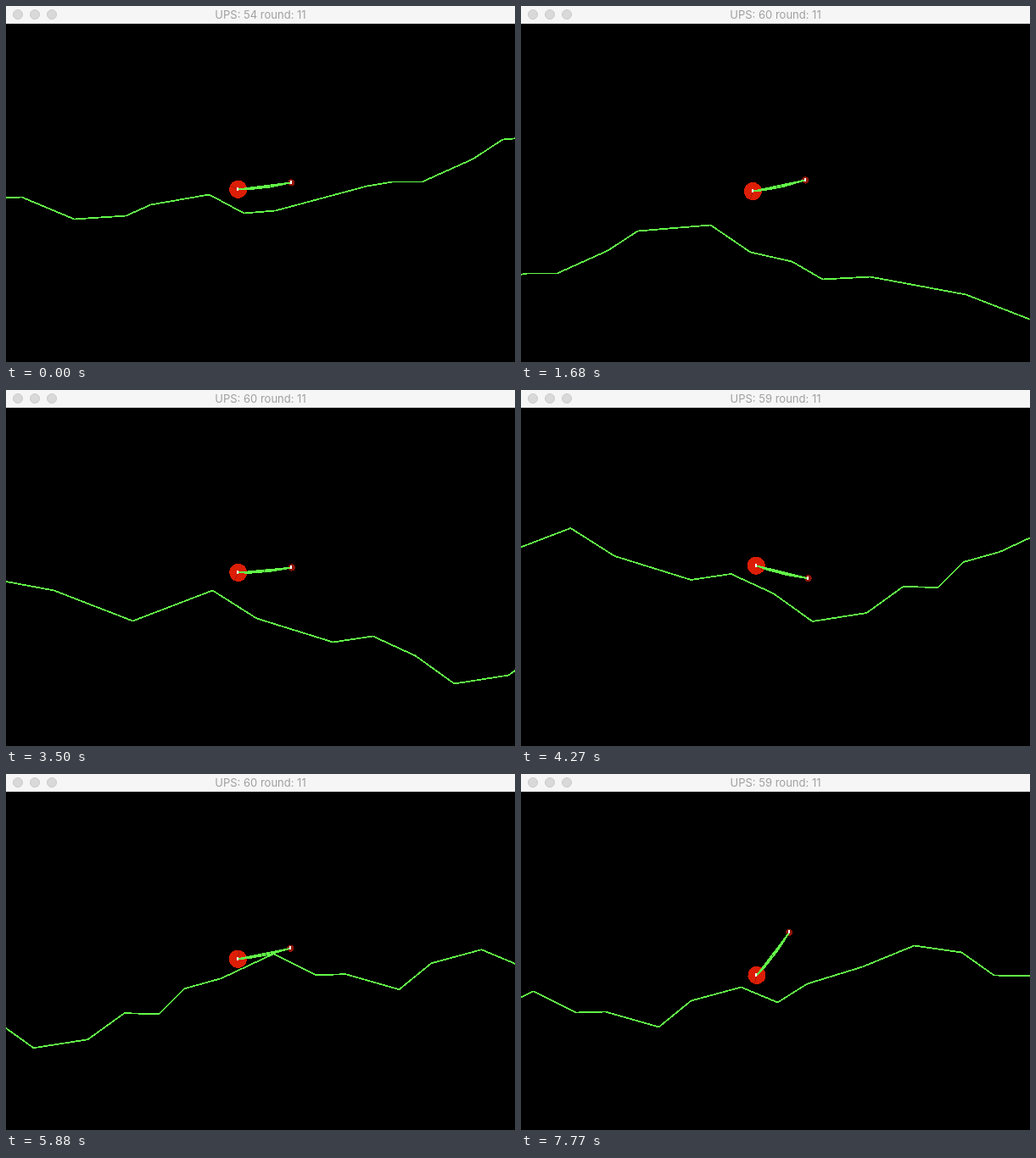
These frames come from a looping animation (600x420 px, 7.84 s). An HTML page:

```html
<!DOCTYPE html>
<html lang="en">
<head>
<meta charset="utf-8">
<title>Hill ride</title>
<style>
  html, body { margin: 0; width: 100%; height: 100%; overflow: hidden; background: #000; }
  .bar {
    position: absolute; top: 0; left: 0; width: 600px; height: 21px;
    box-sizing: border-box; background: #f6f6f6; border-bottom: 1px solid #dedede;
    color: #a0a0a0; text-align: center;
    font: 13px/21px Inter, "Liberation Sans", sans-serif;
  }
  .bar i {
    position: absolute; top: 4px; width: 12px; height: 12px; box-sizing: border-box;
    border-radius: 50%; background: #d9d9d9; border: 1px solid #cbcbcb;
  }
  svg { position: absolute; top: 0; left: 0; shape-rendering: crispEdges; }
  polyline { fill: none; stroke: #62fb48; stroke-width: 1.8; }
  .spoke { stroke: #a81806; stroke-width: 1; }
</style>
</head>
<body>
<svg width="600" height="420" viewBox="-0.5 -0.5 600 420">
  <polyline id="hills"/>
  <g id="rear"><circle r="10.6" fill="#dc1e06"/><line class="spoke" x2="10"/></g>
  <g id="front"><circle r="4" fill="#8f1508"/><line class="spoke" x2="4"/></g>
  <polyline id="frame"/>
  <rect id="rearHub" width="2" height="4" fill="#fff"/>
  <rect id="frontHub" width="2" height="4" fill="#fff"/>
</svg>
<div class="bar">
  <i style="left:8px"></i><i style="left:28px"></i><i style="left:48px"></i>
  <span id="title"></span>
</div>
<script>
const STEP = 70, STEPS = 112;
const BAR = 63.3, REAR = 10.6, FRONT = 4;
const GRAVITY = 2.1, NOSE_DROP = 2; // per step
const el = id => document.getElementById(id);

// Corners of the hills in world coordinates
const ground = [
  [-2, 226], [18, 225], [80, 251], [141, 247], [170, 234], [239, 222], [280, 244],
  [317, 241], [425, 212], [455, 207], [490, 207], [550, 180], [585, 157], [671, 150],
  [718, 182], [767, 193], [803, 214], [859, 211], [972, 232], [1065, 268], [1159, 232],
  [1211, 265], [1301, 293], [1348, 286], [1398, 309], [1444, 342], [1508, 332],
  [1551, 301], [1592, 302], [1622, 272], [1665, 260], [1727, 231], [1777, 256],
  [1812, 255], [1875, 273], [1913, 242], [1972, 226], [2015, 244], [2050, 222],
  [2115, 202], [2176, 177], [2232, 185], [2270, 212], [2320, 213]
];

// Key poses: step, scroll, lift of the ground, tilt in degrees
const keys = [
  [0, 0, 0, 7.2], [24, 448, 108, 12], [34, 623, -2, -15.5], [50, 916, 4, 5.4],
  [72, 1268, -62, 36.7], [95, 1532, -24, -18.4], [111, 1713, 25, 52.8]
];

const updates = [54, 60, 59, 60, 59, 61, 60, 59]; // per second, a new count every 14 steps

function groundY(x) {
  const i = Math.max(1, ground.findIndex(p => p[0] >= x));
  const [x0, y0] = ground[i - 1], [x1, y1] = ground[i];
  return y0 + (y1 - y0) * (x - x0) / (x1 - x0);
}

function speedAt(i) {
  const a = keys[Math.max(i - 1, 0)], b = keys[Math.min(i + 1, keys.length - 1)];
  return (b[1] - a[1]) / (b[0] - a[0]);
}

// Smooth scroll between key i and the next
function scrollAt(i, n) {
  const a = keys[i], b = keys[i + 1], h = b[0] - a[0], u = (n - a[0]) / h, v = 1 - u;
  return a[1] * v * v * (1 + 2 * u) + b[1] * u * u * (3 - 2 * u) +
    h * u * v * (speedAt(i) * v - speedAt(i + 1) * u);
}

// Returns a function giving points along the bar (-0.5 to 0.5), dropped below it
function pose(tilt) {
  const s = Math.sin(tilt * Math.PI / 180), c = Math.cos(tilt * Math.PI / 180);
  const mx = 299.6 + 6 * c - 8.3 * s, my = 222.5 - 6 * s - 10 * c;
  return (along, drop = 0) =>
    [mx + along * BAR * c + drop * s, my - along * BAR * s + drop * c];
}

// Ride the hills under gravity, easing into each key pose
function simulate() {
  const ride = [keys[0].slice(1)];
  let rise = 0;
  for (let i = 0; i < keys.length - 1; i++) {
    const [from, , startLift, startTilt] = keys[i];
    const [to, , endLift, endTilt] = keys[i + 1];
    const leg = [];
    let lift = startLift, tilt = startTilt;
    for (let n = from + 1; n <= to; n++) {
      const scroll = scrollAt(i, n), before = lift;
      const dip = ([x, y], r) => Math.max(0, y + r - groundY(x + scroll) - lift);
      lift += rise - GRAVITY;
      tilt -= NOSE_DROP;
      lift += dip(pose(tilt)(-0.5), REAR);
      tilt += dip(pose(tilt)(0.5), FRONT) / BAR * 180 / Math.PI;
      rise = lift - before;
      leg.push([scroll, lift, tilt]);
    }
    leg.forEach(([scroll, l, t], k) => {
      const w = ((k + 1) / leg.length) ** 3;
      ride.push([scroll, l + w * (endLift - lift), t + w * (endTilt - tilt)]);
    });
  }
  return ride;
}

function place(id, [x, y], turn) {
  el(id).setAttribute('transform', `translate(${x} ${y}) rotate(${turn})`);
  el(id + 'Hub').setAttribute('x', Math.round(x) - 1.5);
  el(id + 'Hub').setAttribute('y', Math.round(y) - 2.5);
}

const ride = simulate();
el('hills').setAttribute('points', ground.join(' '));

function draw(n) {
  const [scroll, lift, tilt] = ride[n];
  const at = pose(tilt), rear = at(-0.5), front = at(0.5);
  el('hills').setAttribute('transform', `translate(${-scroll} ${lift})`);
  place('rear', rear, scroll / REAR * 180 / Math.PI + 206);
  place('front', front, scroll / FRONT * 180 / Math.PI);
  el('frame').setAttribute('points', [rear, front, at(0.1, 2), at(-0.28, 1.6), rear].join(' '));
  el('title').textContent = `UPS: ${updates[Math.floor(n / 14)]} round: 11`;
}

const start = performance.now();
let shown = -1;
function tick() {
  const n = Math.floor((performance.now() - start) / STEP) % STEPS;
  if (n !== shown) draw(shown = n);
  requestAnimationFrame(tick);
}
tick();
</script>
</body>
</html>
```
